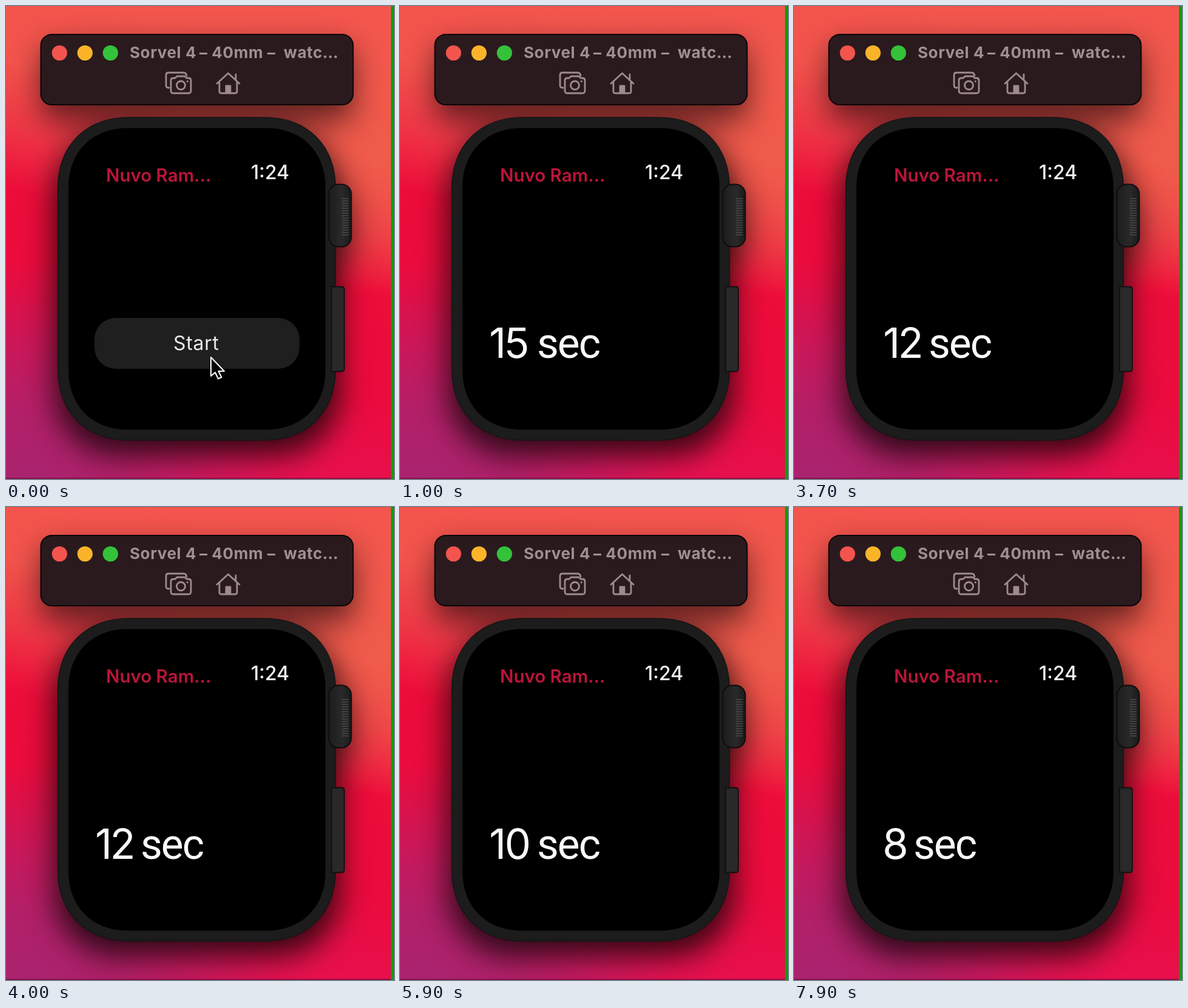
Animation of 640 by 781 pixels, one loop 8 s. Source, as an HTML page:

```html
<!DOCTYPE html>
<html lang="en">
<head>
<meta charset="utf-8">
<title>Watch countdown</title>
<style>
  html, body { margin: 0; width: 100%; height: 100%; overflow: hidden; }
  body {
    background:
      radial-gradient(ellipse 410px 380px at 40px 800px, #a82470 0%, rgba(170,34,108,.85) 35%, rgba(200,24,85,0) 100%),
      radial-gradient(ellipse 260px 240px at 620px 240px, rgba(238,94,74,.75), rgba(238,94,74,0)),
      linear-gradient(196deg, #f4564e 0%, #f3544c 28%, #ef3846 39%, #ed0d3a 50%, #eb0b3e 68%, #e4165f 100%);
  }
  svg { display: block; position: absolute; left: 0; top: 0; }
  text { white-space: pre; }
</style>
</head>
<body>
<svg id="stage" width="640" height="781" viewBox="0 0 640 781">
  <defs>
    <filter id="blur" x="-30%" y="-30%" width="160%" height="160%" color-interpolation-filters="sRGB">
      <feGaussianBlur stdDeviation="25"/>
    </filter>
    <linearGradient id="crownFill">
      <stop offset="0" stop-color="#1d1d1d"/>
      <stop offset=".6" stop-color="#292929"/>
      <stop offset="1" stop-color="#1a1a1a"/>
    </linearGradient>
  </defs>

  <g filter="url(#blur)" fill="#140508">
    <rect x="58" y="68" width="514" height="122" rx="18" opacity=".64"/>
    <rect x="80" y="206" width="470" height="536" rx="105" opacity=".84"/>
    <rect x="530" y="310" width="40" height="110" rx="16" opacity=".6"/>
  </g>

  <!-- toolbar window -->
  <rect x="57.500" y="47" width="515" height="116" rx="18" fill="#2a1a1e" stroke="#0c0506" stroke-width="2"/>
  <circle cx="88.300" cy="77.500" r="12.600" fill="#f4544e"/>
  <circle cx="130.300" cy="77.500" r="12.600" fill="#fbb42a"/>
  <circle cx="172.300" cy="77.500" r="12.600" fill="#34c23b"/>
  <g fill="none" stroke="#9d8b8e" stroke-width="2.800" stroke-linejoin="round" stroke-linecap="round">
    <path d="M269 135H268Q264 135 264 131V114Q264 110 268 110H293Q297 110 298 115"/>
    <path d="M276 119H279L282 116H295L298 119H301Q305 119 305 123V140Q305 144 301 144H276Q272 144 272 140V123Q272 119 276 119Z"/>
    <circle cx="288.500" cy="131" r="7"/>
    <path d="M299 124.500H299.500"/>
    <path d="M348 128L366.500 111L385 128M352 126V141Q352 144 355 144H378Q381 144 381 141V126M379 113V121"/>
    <path d="M363 143V132H370V143Z" fill="#9d8b8e"/>
  </g>

  <!-- watch case -->
  <path id="case" fill="#1c1c1c" stroke="#151515" stroke-width="1.500"/>
  <path id="screen" fill="#000"/>
  <rect x="532.500" y="294.500" width="37" height="103" rx="16" fill="url(#crownFill)" stroke="#0d0d0d" stroke-width="2"/>
  <g id="ridges" stroke="#4a4a4a" stroke-width="1.600"></g>
  <path d="M537 463.500H554Q558 463.500 558 468V599Q558 603.500 554 603.500H537Z" fill="#292929" stroke="#101010" stroke-width="1.800"/>

  <g id="labels"></g>
  <g id="button">
    <rect x="146" y="515" width="338" height="84" rx="35" fill="#1f1f1f"/>
  </g>
  <g id="counter"></g>

  <path id="cursor" d="M0 0V31L7 25L12 35.500L17.500 33L12.500 23H22Z" fill="#050505" stroke="#fff" stroke-width="2" stroke-linejoin="round"/>

  <rect x="0" y="779" width="640" height="2" fill="#6a0838" opacity=".6"/>
  <rect x="635" y="0" width="5" height="781" fill="#06a008"/>
</svg>
<script>
const LOOP = 8000;
const NS = "http://www.w3.org/2000/svg";
const $ = id => document.getElementById(id);
const pen = document.createElement("canvas").getContext("2d");

function add(parent, tag, attrs) {
  const el = document.createElementNS(NS, tag);
  for (const k in attrs) el.setAttribute(k, attrs[k]);
  parent.appendChild(el);
  return el;
}

// Text whose visible left edge, rather than its origin, sits at x.
function label(parent, str, x, y, { size, weight = 400, family = "Inter", fill = "#fff", gap = 0 }) {
  pen.font = `${weight} ${size}px ${family}, sans-serif`;
  const el = add(parent, "text", {
    x: x + pen.measureText(str[0]).actualBoundingBoxLeft, y, fill,
    "font-family": `${family}, sans-serif`,
    "font-size": size, "font-weight": weight, "letter-spacing": gap
  });
  el.textContent = str;
}

// Rounded box with soft, continuous corners.
function softBox(l, t, r, b, c, k) {
  const n = c * (1 - k);
  return `M${l + c} ${t}H${r - c}C${r - n} ${t} ${r} ${t + n} ${r} ${t + c}` +
    `V${b - c}C${r} ${b - n} ${r - n} ${b} ${r - c} ${b}` +
    `H${l + c}C${l + n} ${b} ${l} ${b - n} ${l} ${b - c}` +
    `V${t + c}C${l} ${t + n} ${l + n} ${t} ${l + c} ${t}Z`;
}

$("case").setAttribute("d", softBox(85.5, 184, 543.5, 717, 118, 0.61));
$("screen").setAttribute("d", softBox(103, 201.5, 527, 699.5, 98, 0.6));
for (let y = 318; y < 379; y += 4) add($("ridges"), "path", { d: `M554 ${y}H565` });

const title = { size: 26, weight: 700, fill: "#a08f92", gap: 0.6 };
label($("labels"), "Sorvel 4", 205, 86, title);
label($("labels"), "– 40mm –", 319, 86, title);
label($("labels"), "watc…", 458, 86, title);
label($("labels"), "Nuvo Ram…", 167, 290, { size: 29.5, fill: "#bb1539", weight: 600 });
label($("labels"), "1:24", 405, 285.5, { size: 32, fill: "#f2f2f2", weight: 500 });
label($("button"), "Start", 277, 568, { size: 32, fill: "#ececec", gap: 0.7 });

const digits = { size: 69, fill: "#fafafa" };
const unit = { size: 69.5, family: "Roboto", fill: "#fafafa", gap: -2 };
const unitX = { 15: 229, 14: 229, 13: 226, 12: 225, 11: 213, 10: 229, 9: 198, 8: 200 };
const faces = {};
for (const n in unitX) {
  const g = faces[n] = add($("counter"), "g", { visibility: "hidden" });
  [...n].forEach((d, i) => label(g, d, i ? 176.5 : 150, 580.5, digits));
  label(g, "sec", unitX[n], 580.5, unit);
}

// time, x, y; no position means hidden
const cursorSteps = [[0, 338, 580], [100, 327, 562], [200, 321, 556], [700, 350, 714], [800]];
// time, scale, opacity
const buttonSteps = [[0, 1, 1], [500, 0.97, 0.8], [600, 0.95, 0.55], [700, 1, 0]];

const at = (steps, t) => steps.filter(s => s[0] <= t).pop();

function draw(t) {
  const [, x, y] = at(cursorSteps, t);
  const cursor = $("cursor");
  cursor.setAttribute("visibility", x === undefined ? "hidden" : "visible");
  if (x !== undefined) cursor.setAttribute("transform", `translate(${x} ${y})`);

  const [, scale, opacity] = at(buttonSteps, t);
  $("button").setAttribute("transform", `translate(315 557) scale(${scale}) translate(-315 -557)`);
  $("button").setAttribute("opacity", opacity);

  const left = t < 700 ? 0 : 15 - Math.floor((t - 700) / 1000);
  for (const n in faces) faces[n].setAttribute("visibility", +n === left ? "visible" : "hidden");
}

const start = performance.now();
function tick() {
  draw(Math.max(0, performance.now() - start) % LOOP);
  requestAnimationFrame(tick);
}
tick();
</script>
</body>
</html>
```
